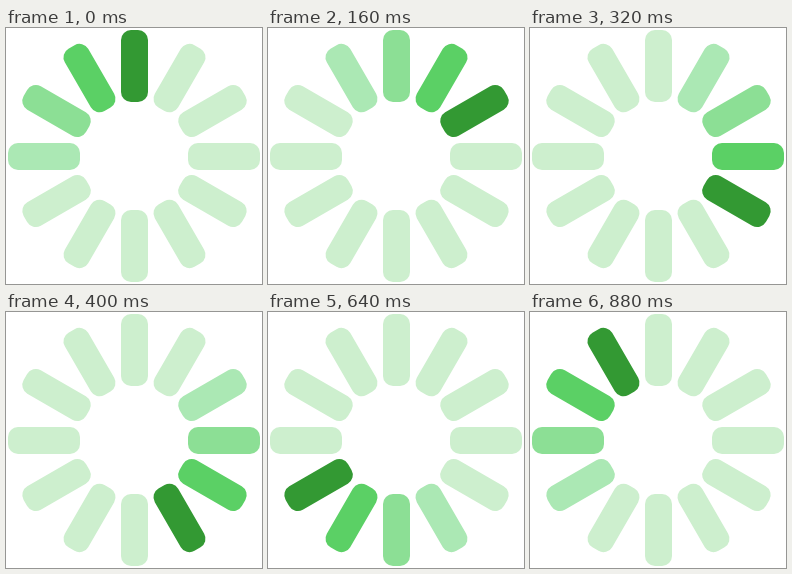
Recreate the animation shown at these times as an HTML page with a canvas. Size 256x256 px, loop 960 ms.

```html
<!DOCTYPE html>
<html lang="en">
<head>
<meta charset="utf-8">
<title>Spinner</title>
<style>
html, body { margin: 0; width: 100%; height: 100%; overflow: hidden; background: #fff; }
canvas { display: block; }
</style>
</head>
<body>
<canvas id="stage" width="256" height="256"></canvas>
<script>
const ctx = document.getElementById('stage').getContext('2d');
const BARS = 12;
const STEP_MS = 80;
const TRAIL = ['#339933', '#5bd065', '#8cdf95', '#abe8b4'];
const IDLE = '#cdefce';

function drawBar(index, color) {
  // Half-pixel offset keeps the odd-width upright and level bars crisp.
  const level = index % 6 === 3;
  ctx.save();
  ctx.translate(level ? 128 : 128.5, level ? 128.5 : 128);
  ctx.rotate(index * 2 * Math.PI / BARS);
  ctx.fillStyle = color;
  ctx.beginPath();
  ctx.roundRect(-13.5, -126, 27, 72, 10);
  ctx.fill();
  ctx.restore();
}

function draw(time) {
  const head = Math.floor(time / STEP_MS) % BARS;
  ctx.fillStyle = '#fff';
  ctx.fillRect(0, 0, 256, 256);
  for (let i = 0; i < BARS; i++) {
    const age = (head - i + BARS) % BARS;
    drawBar(i, TRAIL[age] || IDLE);
  }
}

let start;
function tick(now) {
  start ??= now;
  draw(Math.max(0, now - start));
  requestAnimationFrame(tick);
}
draw(0);
requestAnimationFrame(tick);
</script>
</body>
</html>
```
